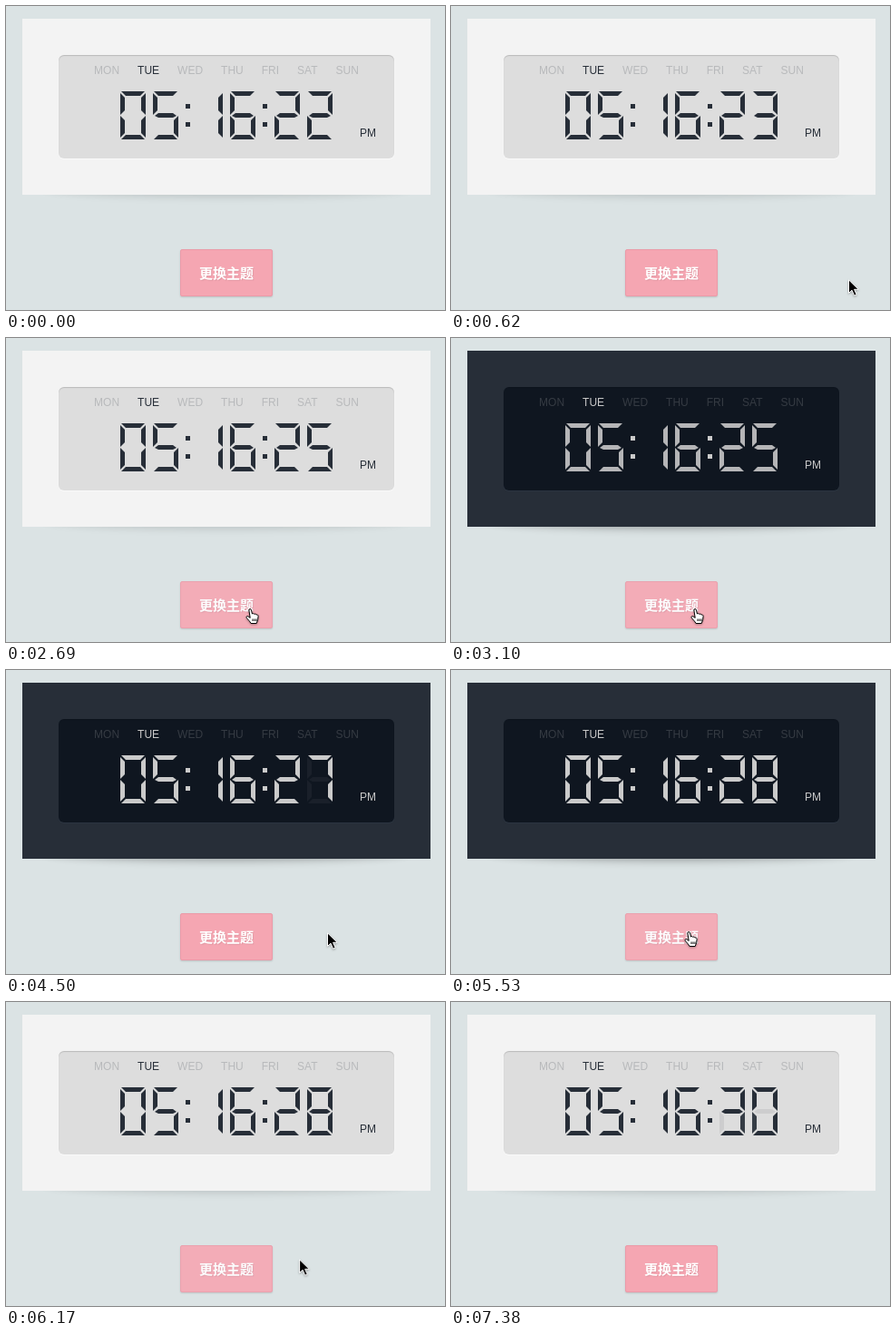
These frames come from a looping animation (484 px wide and 335 px high, 7.49 s). An HTML page:

```html
<!DOCTYPE html>
<html lang="zh-CN">
<head>
<meta charset="utf-8">
<title>Digital clock</title>
<style>
  html, body { margin: 0; width: 100%; height: 100%; overflow: hidden; background: #dbe3e4; }
  .stage { position: relative; width: 484px; height: 335px; overflow: hidden; font-family: Arial, "Liberation Sans", sans-serif; }
  .stage > *, .display > * { position: absolute; }
  .shadow { left: 43px; top: 186px; width: 400px; height: 20px; border-radius: 100%; }
  .clock { left: 18px; top: 14px; width: 450px; height: 194px; }
  .display { position: absolute; left: 40px; top: 40px; width: 370px; height: 114px; border-radius: 6px; }
  .weekdays, .ampm { font-size: 12px; line-height: 14px; white-space: nowrap; }
  .weekdays { left: 0; top: 10px; width: 100%; display: flex; justify-content: center; }
  .weekdays span { padding: 0 10px; opacity: .2; }
  .weekdays .on { opacity: 1; }
  .ampm { right: 20px; top: 79px; }
  .face { left: 0; top: 0; fill: currentColor; }
  .button {
    left: 192px; top: 268px; width: 102px; height: 52px; box-sizing: border-box;
    border: 1px solid #eb9aa8; border-radius: 2px; background: #f5a6b2;
    box-shadow: 0 1px 2px rgba(0, 0, 0, .15);
    color: #fff; font: bold 15px/50px "Noto Sans CJK SC", "Noto Sans CJK", sans-serif;
    text-align: center; text-shadow: 1px 1px 1px rgba(0, 0, 0, .08);
  }
  .cursor { left: 0; top: 0; overflow: visible; filter: drop-shadow(0 1px 1px rgba(0, 0, 0, .3)); }
</style>
</head>
<body>
<div class="stage">
  <div class="shadow"></div>
  <div class="clock">
    <div class="display">
      <div class="weekdays">
        <span>MON</span><span class="on">TUE</span><span>WED</span><span>THU</span><span>FRI</span><span>SAT</span><span>SUN</span>
      </div>
      <div class="ampm">PM</div>
      <svg class="face" width="370" height="114">
        <path d="M140 54h5v5h-5zm0 20h5v5h-5zM225 54h5v5h-5zm0 20h5v5h-5z"/>
        <g class="digits"></g>
      </svg>
    </div>
  </div>
  <div class="button">更换主题</div>
  <svg class="cursor" width="20" height="22">
    <path class="arrow" d="M.5 .8V15.4L4 12.2L6.6 18.2L9.2 17.1L6.6 11.3H11.2Z" fill="#000" stroke="#fff"/>
    <path class="hand" transform="translate(-5)" fill="#fff" stroke="#000" stroke-linejoin="round"
      d="M3.9 2C3.8 .2 6.1 .1 6.5 1.8L7.4 6C8.1 5.2 9.4 5.4 9.7 6.4C10.5 5.7 11.7 6 12 7.1C13 6.6 14.1 7.2 14.1 8.4L13.7 12.4L12.2 16.5H6C5.2 14.5 2.7 12.3 1.3 10.4C.4 9 1.9 8 3.1 8.9L5.2 10.4ZM8 11.5V14M10 11.5V14M12 11.5V14"/>
  </svg>
</div>
<script>
  const LOOP = 7490;
  const TO_DARK = 2980, TO_LIGHT = 5850, RECOLOR = 210;
  const $ = selector => document.querySelector(selector);

  // frames: [time in ms, properties, easing towards the next frame]
  function track(el, frames, easing = 'linear') {
    const keys = frames.map(([ms, props, ease = easing]) => ({ offset: ms / LOOP, easing: ease, ...props }));
    keys.push({ offset: 1, ...frames[frames.length - 1][1] });
    el.animate(keys, { duration: LOOP, iterations: Infinity });
  }

  const steps = (el, frames) => track(el, frames, 'step-end');
  const theme = (el, light, dark) => steps(el, [[0, light], [TO_DARK, dark], [TO_LIGHT, light]]);

  const INK = { color: '#272e38' }, PALE = { color: '#cacaca' };
  theme($('.clock'), { backgroundColor: '#f3f3f3', ...INK }, { backgroundColor: '#272e38', ...PALE });
  theme($('.display'),
    { backgroundColor: '#dddddd', boxShadow: 'inset 0 1px 1px rgba(0,0,0,.16), 0 1px 1px #fafafa' },
    { backgroundColor: '#0f1620', boxShadow: 'inset 0 1px 1px rgba(0,0,0,.08), 0 1px 1px #2d3642' });
  theme($('.shadow'),
    { boxShadow: '0 4px 10px rgba(0,0,0,.15)' },
    { boxShadow: '0 4px 10px rgba(0,0,0,.3)' });
  track($('.digits'), [
    [0, INK], [TO_DARK, INK, 'ease'], [TO_DARK + RECOLOR, PALE],
    [TO_LIGHT, PALE, 'ease'], [TO_LIGHT + RECOLOR, INK]
  ]);

  // Segments: top, middle, bottom, upper left, upper right, lower left, lower right
  const SEGMENTS = [
    'M1 0H27L22 5H6Z', 'M2 27L6 24H22L26 27L22 29H6Z', 'M6 48H22L27 53H1Z',
    'M0 2L5 7V21L0 26Z', 'M28 2L23 7V21L28 26Z',
    'M0 27L5 32V46L0 51Z', 'M28 27L23 32V46L28 51Z'
  ];
  const LIT = ['134567', '57', '12356', '12357', '2457', '12347', '123467', '157', '1234567', '123457'];
  const TICKS = [390, 1480, 2470, 3420, 4330, 5330, 6240, 7270];
  const FADE = 170, FIRST_SECOND = 22;
  const GHOST_SECOND = 27, GHOST = .06;

  function svg(name, attrs, parent) {
    const el = document.createElementNS('http://www.w3.org/2000/svg', name);
    for (const key in attrs) el.setAttribute(key, attrs[key]);
    return parent.appendChild(el);
  }

  function drawDigit(x, digitAt) {
    const group = svg('g', { transform: `translate(${x} 40)` }, $('.digits'));
    SEGMENTS.forEach((d, i) => {
      const isLit = second => LIT[digitAt(second)].includes(i + 1);
      let opacity = isLit(FIRST_SECOND) ? 1 : 0;
      const frames = [[0, { opacity }]];
      TICKS.forEach((ms, n) => {
        const second = FIRST_SECOND + n + 1;
        const next = isLit(second) ? 1 : second === GHOST_SECOND && opacity ? GHOST : 0;
        if (next === opacity) return;
        frames.push([ms, { opacity }, 'ease'], [ms + FADE, { opacity: next }]);
        opacity = next;
      });
      track(svg('path', { d }, group), frames);
    });
  }

  [[68, 0], [104, 5], [153, 1], [189, 6]].forEach(([x, digit]) => drawDigit(x, () => digit));
  drawDigit(238, second => Math.floor(second / 10));
  drawDigit(274, second => second % 10);

  const at = (x, y) => ({ transform: `translate(${x}px, ${y}px)` });
  const corner = at(488, 340), right = at(438, 301), press = at(269, 298);
  const aside = at(354, 289), pressAgain = at(262, 288), away = at(340, 288);
  track($('.cursor'), [
    [0, corner], [390, corner, 'ease-out'], [620, right],
    [2210, right, 'ease-in-out'], [2690, press],
    [4190, press, 'ease-in-out'], [4500, aside],
    [5330, aside, 'ease-in-out'], [5530, pressAgain],
    [5960, pressAgain, 'ease-in'], [6170, at(323, 283), 'ease-out'], [6410, away],
    [6560, away, 'ease-in'], [6790, at(392, 338)]
  ]);

  const shown = { opacity: 1 }, hidden = { opacity: 0 };
  const pointer = (el, off, on) =>
    steps(el, [[0, off], [2570, on], [4300, off], [5445, on], [6080, off]]);
  pointer($('.hand'), hidden, shown);
  pointer($('.arrow'), shown, hidden);

  const hover = { opacity: .9 };
  track($('.button'), [
    [0, shown], [2570, shown], [2690, hover], [4300, hover], [4440, shown],
    [5445, shown], [5530, hover], [6180, hover], [6340, shown]
  ]);
</script>
</body>
</html>
```
